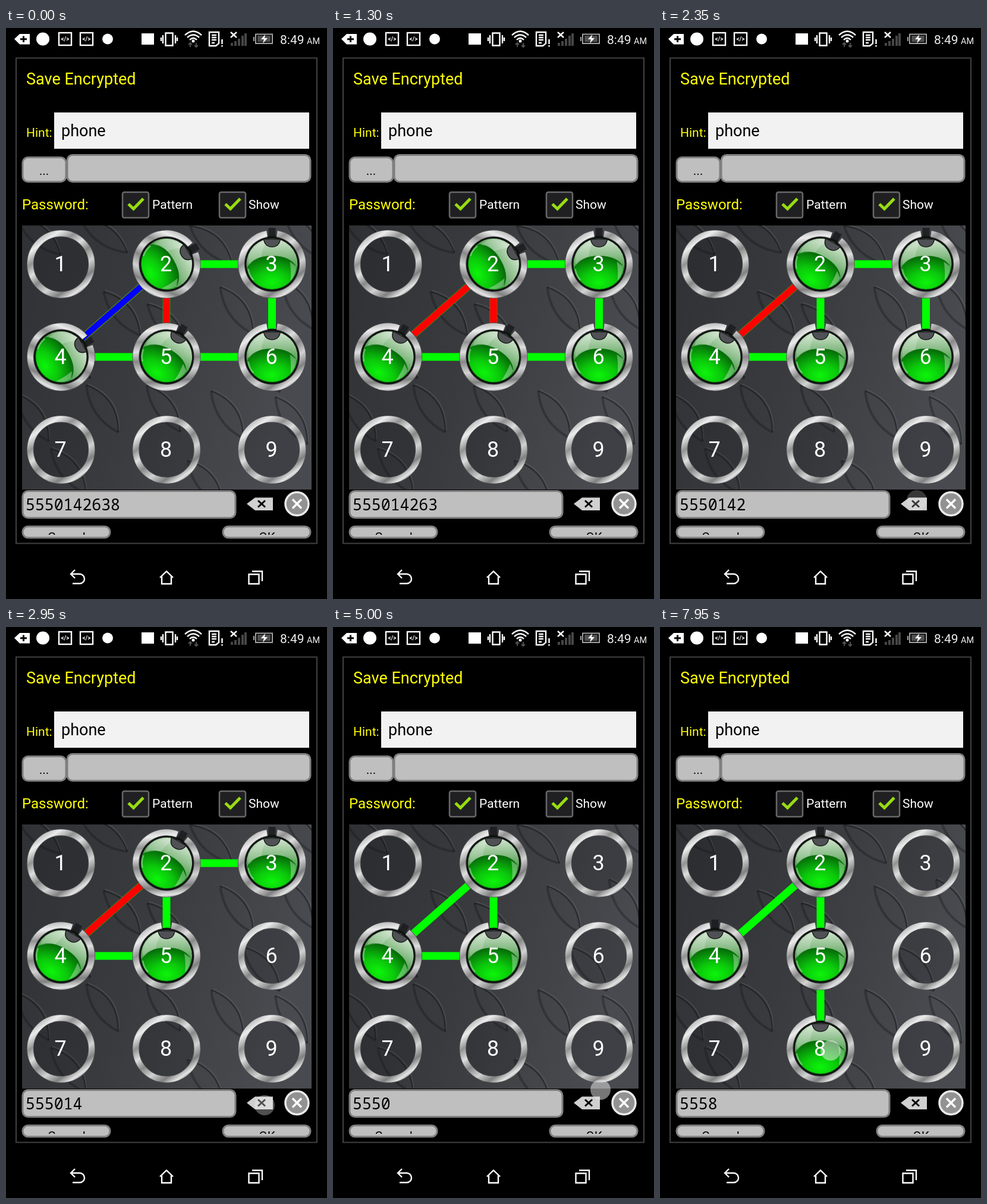
Recreate the animation shown at these times as an HTML page. Size 540 by 960 pixels, loop 8000 ms.

```html
<!DOCTYPE html>
<html lang="en">
<head>
<meta charset="utf-8">
<title>Pattern lock</title>
<style>
html, body { margin: 0; width: 100%; height: 100%; overflow: hidden; background: #000; }
svg { display: block; width: 100vw; height: 100vh; font-family: Roboto, sans-serif; }
.y { fill: #ffff08; }
.w { fill: #fff; }
.mid { text-anchor: middle; }
.ico { fill: none; stroke: #fff; stroke-width: 2.4; }
.btn { fill: #bfbfbf; stroke: #7f7f7f; stroke-width: 3; }
</style>
</head>
<body>
<svg viewBox="0 0 540 960" xmlns="http://www.w3.org/2000/svg">
  <defs>
    <linearGradient id="plate" x2="1" y2=".25">
      <stop stop-color="#2f3134"/><stop offset=".5" stop-color="#393b3e"/><stop offset="1" stop-color="#484a4f"/>
    </linearGradient>
    <linearGradient id="metal" x1=".15" x2=".85" y2="1">
      <stop stop-color="#a4a4a4"/><stop offset=".13" stop-color="#ececec"/><stop offset=".27" stop-color="#929292"/>
      <stop offset=".4" stop-color="#dedede"/><stop offset=".53" stop-color="#888"/><stop offset=".68" stop-color="#d2d2d2"/>
      <stop offset=".82" stop-color="#808080"/><stop offset=".92" stop-color="#e4e4e4"/><stop offset="1" stop-color="#737373"/>
    </linearGradient>
    <linearGradient id="glass" x2="0" y2="1">
      <stop stop-color="#d5e6d3"/><stop offset=".35" stop-color="#86bb84"/><stop offset=".65" stop-color="#3c8f3a"/><stop offset="1" stop-color="#0a5c0a"/>
    </linearGradient>
    <radialGradient id="glow" cx=".5" cy=".8" r=".75">
      <stop stop-color="#0cf50a"/><stop offset=".45" stop-color="#0bc80b"/><stop offset="1" stop-color="#067009"/>
    </radialGradient>
    <clipPath id="pad"><rect x="27" y="332" width="487" height="444"/></clipPath>
    <clipPath id="fold"><rect y="830" width="540" height="22"/></clipPath>
    <g id="ring">
      <circle r="51.700" fill="#1c1d20" fill-opacity=".22"/>
      <circle r="51.700" fill="none" stroke="#505154" stroke-width="11.800"/>
      <circle r="51.700" fill="none" stroke="url(#metal)" stroke-width="10"/>
    </g>
    <g id="lit">
      <circle r="47.500" fill="#0e140f"/>
      <circle r="43" fill="url(#glass)"/>
      <path d="M-42,6 Q-32,-14 0,-14 Q32,-14 42,6 A42.500 42.500 0 0 1 -42,6Z" fill="url(#glow)"/>
      <path d="M-36,-21 Q-24,-36 -8,-40 Q-16,-28 -18,-12 Q-30,-8 -39,2 Q-42,-10 -36,-21Z" fill="#fff" opacity=".2"/>
      <path d="M41,4 Q40,18 31,28 Q33,14 30,-4Z" fill="#fff" opacity=".35"/>
      <path d="M-40,8 Q-38,20 -31,27" fill="none" stroke="#e7f8e7" stroke-width="2.500" opacity=".4"/>
      <path d="M-14,-42 H14 Q12,-29 0,-29 Q-12,-29 -14,-42Z" fill="#505154" stroke="#17181a" stroke-width="1.500"/>
      <path d="M8,-51.100 A51.700 51.700 0 1 1 -8,-51.100" fill="none" stroke="#505154" stroke-width="11.800"/>
      <path d="M8.500,-51 A51.700 51.700 0 1 1 -8.500,-51" fill="none" stroke="url(#metal)" stroke-width="10"/>
    </g>
    <g id="check">
      <rect x="196" y="276" width="44" height="43" rx="3" fill="#202022" stroke="#68686a" stroke-width="2.500"/>
      <path d="M206,296 L214.500,304 L231,287" fill="none" stroke="#98dc12" stroke-width="5"/>
    </g>
    <g id="tagbox">
      <rect x="89" y="8" width="21" height="21" class="ico"/>
      <text x="99.500" y="22" font-size="10" font-weight="700" class="w mid">&lt;/&gt;</text>
    </g>
  </defs>
  <rect width="540" height="960"/>

  <!-- status bar -->
  <path d="M14,18.500 L23,10 H40 V27.500 H23Z" class="w"/>
  <path d="M29.500,13.500 V24 M24,18.700 H35" stroke="#000" stroke-width="3"/>
  <circle cx="62" cy="18.500" r="11" class="w"/>
  <use href="#tagbox"/><use href="#tagbox" x="36"/>
  <circle cx="171" cy="18.500" r="9" class="w"/>
  <rect x="228" y="9" width="21" height="19" class="w"/>
  <path d="M268.500,8.500 H280.500 V29.500 H268.500Z M264,12 V26 M285,12 V26 M261,16 V22 M288,16 V22" class="ico"/>
  <path d="M301,12 Q315,-1 329,12 M305,16 Q315,7 325,16 M309,20 Q315,14 321,20" class="ico"/>
  <circle cx="315" cy="22" r="2.500" class="w"/>
  <path d="M310,32 V26 M307,28 L310,25 L313,28 M320,25 V31 M317,29 L320,32 L323,29" fill="none" stroke="#505050" stroke-width="2"/>
  <path d="M342,7 H358 V26 L353,30 H342Z M346,12 H354 M346,16 H354 M346,20 H354 M346,25 H351" class="ico"/>
  <path d="M363.500,19 V27 M363.500,29 V31.500" class="ico"/>
  <path d="M378,7 L388,16 M388,7 L378,16" class="ico"/>
  <path d="M380,30 V25 M386,30 V22 M392,30 V18 M398,30 V13 M403,30 V9" stroke="#464646" stroke-width="4"/>
  <path d="M420,10.500 H448 V26 H420Z M417,15 V22" fill="none" stroke="#a2a2a2" stroke-width="2"/>
  <rect x="423" y="13" width="22" height="10.500" fill="#505050"/>
  <path d="M436,11 L429,19 H434 L432,26 L440,17 H435Z" class="w"/>
  <text x="461" y="27" font-size="21" fill="#eee">8:49</text>
  <text x="506" y="27" font-size="14.500" fill="#eee">AM</text>

  <!-- dialog -->
  <rect x="17" y="50.500" width="506" height="816" fill="none" stroke="#414141" stroke-width="2"/>
  <text x="34" y="95" font-size="27" class="y">Save Encrypted</text>
  <text x="34" y="183" font-size="21" class="y">Hint:</text>
  <rect x="81" y="142" width="429" height="61" fill="#f2f2f2"/>
  <text x="93" y="182" font-size="27">phone</text>
  <rect x="28" y="217.500" width="73" height="41" rx="9" class="btn"/>
  <text x="64" y="247" font-size="21" class="mid">...</text>
  <rect x="103" y="213.500" width="409" height="45" rx="9" class="btn"/>
  <text x="27" y="305" font-size="24" class="y">Password:</text>
  <use href="#check"/><use href="#check" x="163"/>
  <text x="246" y="304" font-size="21" class="w">Pattern</text>
  <text x="408" y="304" font-size="21" class="w">Show</text>

  <g clip-path="url(#pad)">
    <rect x="27" y="332" width="487" height="444" fill="url(#plate)"/>
    <g id="tread" fill="none"></g>
    <g id="lines"></g>
    <g id="nodes"></g>
  </g>

  <rect x="28" y="778.500" width="358" height="45" rx="9" class="btn"/>
  <text id="code" x="33" y="811" font-size="26.500" style="font-family: 'Noto Sans Mono', monospace"></text>
  <path d="M405,800 L419,789.500 H449 V811 H419Z" fill="#d0d0d0"/>
  <path d="M424,794.500 L436,805.500 M436,794.500 L424,805.500" stroke="#000" stroke-width="3"/>
  <circle cx="489.500" cy="800" r="19.500" fill="#929292" stroke="#eaeaea" stroke-width="3.500"/>
  <path d="M482,792.500 L497,807.500 M497,792.500 L482,807.500" stroke="#fff" stroke-width="3.500"/>
  <rect x="28" y="838" width="147" height="19" rx="9" class="btn"/>
  <rect x="365" y="838" width="147" height="19" rx="9" class="btn"/>
  <g clip-path="url(#fold)" font-size="21" class="mid">
    <text x="102" y="863">Cancel</text><text x="439" y="863">OK</text>
  </g>

  <!-- navigation bar -->
  <path d="M116,911 L109,918 L116,925 M109,918 H124 A8 8 0 0 1 124,934 H112" class="ico"/>
  <path d="M259,924 L270,913.500 L281,924 M262,921.500 V934.500 H278 V921.500" class="ico"/>
  <path d="M408.500,918.500 H425.500 V934.500 H408.500Z M414,913.500 H431 V930" class="ico"/>

  <circle id="touch" r="17" fill="#eee"/>
</svg>
<script>
const LOOP = 8000, FADE = 150;
const ROUTE = [4, 2, 5, 4, 2, 3, 6, 5, 2, 4];
const CODE = "5550142638";
const COLORS = ["#00ff00", "#ff0000", "#0000ff"];

// down, up, x, y, effect on the code length
const TAPS = [
  [700, 800, 431, 800, -1], [1400, 1500, 431, 800, -1], [2200, 2270, 432, 794, -1],
  [2800, 2900, 435, 804, -1], [3400, 3500, 439, 815, -1], [3900, 4000, 438, 812, -1],
  [4950, 5050, 450, 778, 0], [5600, 5700, 436, 814, -1], [7800, 8200, 287, 712, 0]
];
const ADD_AT = 7850;

// tread lenses: x, y, tilt
const TREAD = [
  [162, 640, 56], [45, 655, 56], [108, 555, 45], [55, 350, 40], [165, 350, 35], [388, 475, 55],
  [270, 500, 48], [372, 650, 56], [480, 660, 56], [490, 465, 58], [500, 350, 50], [345, 365, 42],
  [195, 480, 50], [265, 640, 54], [430, 575, 50], [105, 745, 52], [335, 765, 52]
];

const $ = id => document.getElementById(id);
const pos = d => [92.5 + (d - 1) % 3 * 177.5, 397 + Math.floor((d - 1) / 3) * 156];

$("tread").innerHTML = TREAD.map(([x, y, a]) => `<g transform="translate(${x} ${y}) rotate(${a})">
  <path d="M-48,-3 Q0,-36 46,-3" stroke="#66686c" stroke-width="2" opacity=".35"/>
  <path d="M-48,0 Q0,-33 48,0" stroke="#141517" stroke-width="2.5" opacity=".5"/>
  <path d="M-48,0 Q0,26 48,0" stroke="#141517" stroke-width="4" opacity=".35"/></g>`).join("");

function drawPattern(route) {
  const uses = {}, visits = {};
  route.forEach((d, i) => {
    visits[d] = (visits[d] || 0) + 1;
    if (!i) return;
    const key = [route[i - 1], d].sort().join("");
    uses[key] = (uses[key] || 0) + 1;
  });

  // each further visit turns the dial by 30 degrees
  const place = d => `translate(${pos(d)}) rotate(${30 * ((visits[d] || 1) - 1)})`;

  const slots = Object.keys(visits).map(d =>
    `<path d="M0,-61 V-42" transform="${place(d)}" stroke="#1b1c1f" stroke-width="12" opacity=".85"/>`);
  // every reuse lays a narrower stroke over the last one
  const links = Object.keys(uses).map(key => {
    const [a, b] = [...key].map(pos), top = uses[key] - 1;
    return COLORS.slice(0, top + 1).map((c, i) =>
      `<path d="M${a} L${b}" stroke="${c}" stroke-width="${13 - 1.5 * i}" opacity="${i < top ? 0.5 : 1}"/>`).join("");
  });
  $("lines").innerHTML = slots.concat(links).join("");

  let nodes = "";
  for (let d = 1; d <= 9; d++) {
    const [x, y] = pos(d);
    nodes += `<use href="#${visits[d] ? "lit" : "ring"}" transform="${place(d)}"/>
      <text x="${x - 1}" y="${y + 12}" font-size="36" class="w mid">${d}</text>`;
  }
  $("nodes").innerHTML = nodes;
}

let shown = "";
function render(t) {
  const size = TAPS.reduce((n, tap) => t >= tap[1] ? n + tap[4] : n, ROUTE.length);
  const added = t >= ADD_AT;
  const text = CODE.slice(0, size) + (added ? "8" : "");
  if (text !== shown) {
    shown = text;
    $("code").textContent = text;
    drawPattern(ROUTE.slice(0, size).concat(added ? 8 : []));
  }

  const tap = TAPS.find(([down, up]) => t >= down && t < up + FADE);
  const dot = $("touch");
  dot.setAttribute("opacity", tap ? 0.5 * Math.min(1, 1 - (t - tap[1]) / FADE) : 0);
  if (tap) {
    dot.setAttribute("cx", tap[2]);
    dot.setAttribute("cy", tap[3]);
  }
}

const start = performance.now();
function tick() {
  render((performance.now() - start) % LOOP);
  requestAnimationFrame(tick);
}
tick();
</script>
</body>
</html>
```
